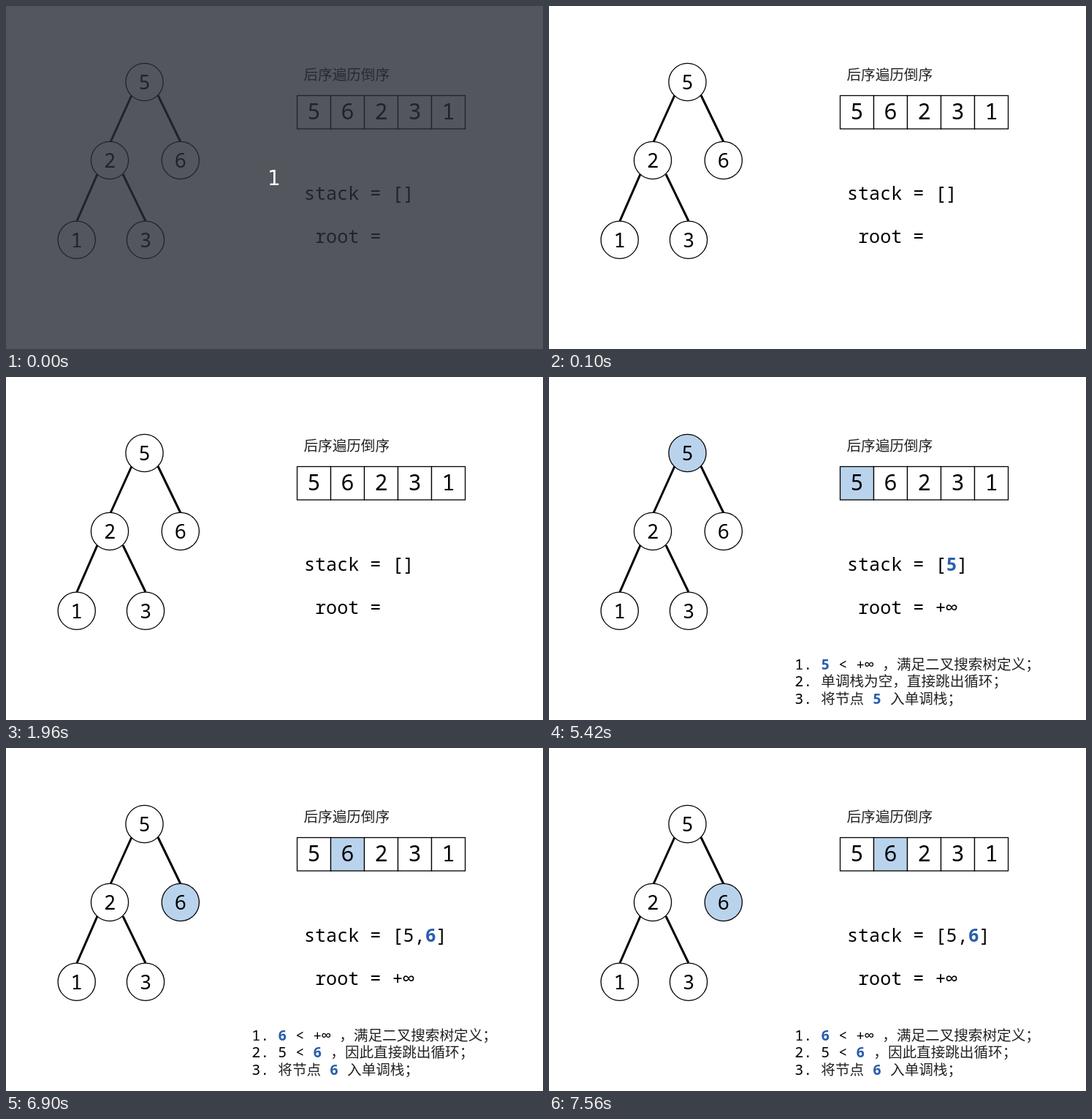
Write an HTML page that moves like this. It is 735 px wide and 469 px high and loops after 8 s.

```html
<!DOCTYPE html>
<html lang="zh-CN">
<head>
<meta charset="utf-8">
<title>单调栈</title>
<style>
  html, body { margin: 0; width: 100%; height: 100%; overflow: hidden; background: #fff; }
  svg { display: block; width: 735px; height: 469px; }
  text { font: 25.1px "Noto Sans Mono", "Noto Sans CJK SC", monospace; white-space: pre; }
  .note { font-size: 20px; }
  .han { font-family: "Noto Sans CJK SC", sans-serif; font-size: .98em; font-weight: 300; fill: #222; }
  .node, .cell { fill: #fff; stroke: #000; stroke-width: 1.3; }
  .on { fill: #bad3ec; }
  .digit { text-anchor: middle; }
  .key { fill: #2b5fad; font-weight: bold; }
  .edge { stroke: #000; stroke-width: 3; }
</style>
</head>
<body>
<svg id="stage" viewBox="0 0 735 469"></svg>
<script>
const LOOP = 8000;
const nodes = [[5, 189.5, 104], [2, 142, 211], [6, 238.8, 211], [1, 96.7, 319.8], [3, 191, 319.8]];
const edges = [[172, 122, 143, 186], [208, 122, 239, 186], [125, 230, 97, 294], [160, 230, 191, 294]];
const order = [5, 6, 2, 3, 1];

// Asterisks mark highlighted text.
const steps = [
  { at: 0, stack: '', root: '', notes: [], cover: true },
  { at: 100, stack: '', root: '', notes: [] },
  { at: 3200, active: 5, stack: '*5*', root: '+∞',
    notes: ['*5* < +∞ ，满足二叉搜索树定义；', '单调栈为空，直接跳出循环；', '将节点 *5* 入单调栈；'] },
  { at: 6900, active: 6, stack: '5,*6*', root: '+∞',
    notes: ['*6* < +∞ ，满足二叉搜索树定义；', '5 < *6* ，因此直接跳出循环；', '将节点 *6* 入单调栈；'] }
];

const label = (x, y, s, attrs = '') => {
  const body = s.replace(/</g, '&lt;')
    .replace(/[\u4e00-\u9fff，；]+/g, '<tspan class="han">$&</tspan>')
    .replace(/\*(.+?)\*/g, '<tspan class="key">$1</tspan>');
  return `<text x="${x}" y="${y}" ${attrs}>${body}</text>`;
};
const digit = (x, y, n, size) => label(x, y, String(n), `class="digit" style="font-size:${size}px"`);

function render({ active, stack, root, notes, cover }) {
  const on = n => n === active ? ' on' : '';
  return [
    ...edges.map(([x1, y1, x2, y2]) =>
      `<line class="edge" x1="${x1}" y1="${y1}" x2="${x2}" y2="${y2}"/>`),
    ...nodes.map(([n, x, y]) =>
      `<circle class="node${on(n)}" cx="${x}" cy="${y}" r="25.6"/>` + digit(x, y + 10.4, n, 27)),
    label(407.5, 100.5, '后序遍历倒序', 'class="note"'),
    ...order.map((n, i) => {
      const x = 398.5 + 46 * i;
      return `<rect class="cell${on(n)}" x="${x}" y="122.5" width="46" height="45.5"/>` +
        digit(x + 23, 154.6, n, 30);
    }),
    label(408, 264.6, `stack = [${stack}]`),
    label(408, 323.6, ` root = ${root}`),
    ...notes.map((s, i) => label(336.3, 399.8 + 23.5 * i, `${i + 1}. ${s}`, 'class="note"')),
    cover ? '<rect width="735" height="469" fill="#282c34" fill-opacity=".8"/>' +
      label(367, 245, '1', 'class="digit" fill="#fff" style="font:28px \'DejaVu Sans\',sans-serif"') : ''
  ].join('');
}

const stage = document.getElementById('stage');
let shown;
function tick() {
  const t = performance.now() % LOOP;
  const step = steps.findLast(s => s.at <= t);
  if (step !== shown) stage.innerHTML = render(shown = step);
  requestAnimationFrame(tick);
}
tick();
</script>
</body>
</html>
```
